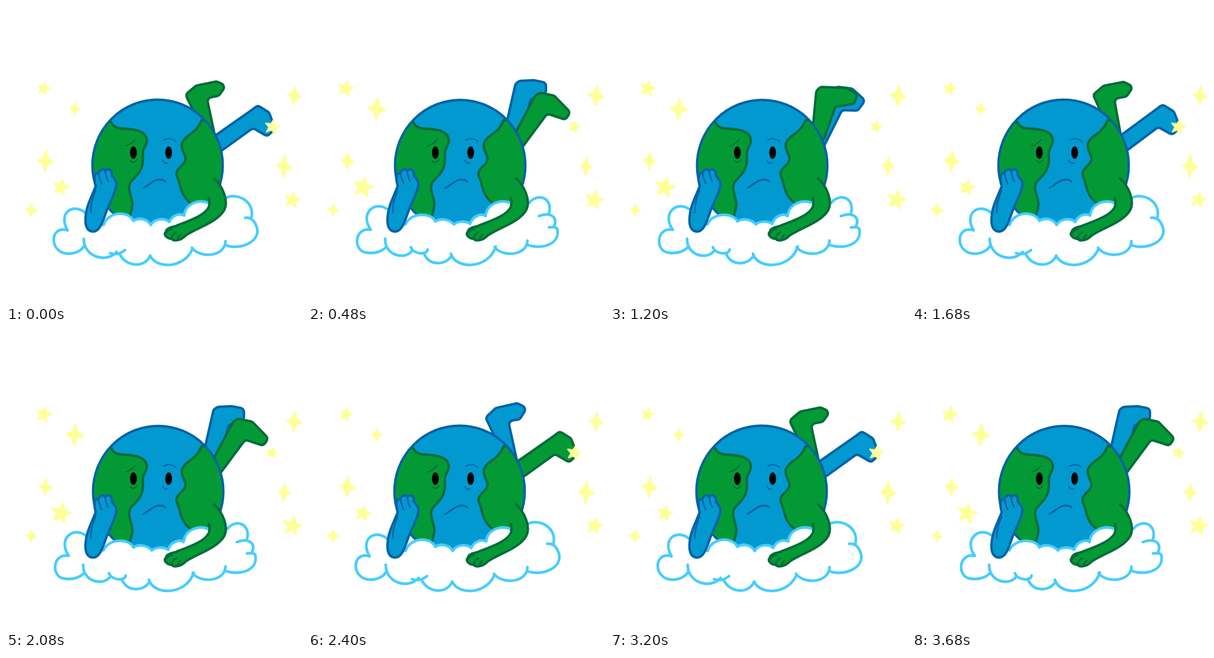
An HTML page with a canvas that plays this animation: 495 px wide and 498 px high, repeating every 3.76 s.

```html
<!DOCTYPE html>
<html lang="en">
<head>
<meta charset="utf-8">
<title>Weary planet on a cloud</title>
<style>
html, body { margin: 0; width: 100%; height: 100%; overflow: hidden; background: #fff; }
canvas { display: block; }
</style>
</head>
<body>
<canvas id="stage" width="495" height="498"></canvas>
<script>
const ctx = document.getElementById('stage').getContext('2d');
ctx.lineCap = ctx.lineJoin = 'round';

const BLUE = '#0299d0', NAVY = '#0762a6', GREEN = '#039a36', FOREST = '#066b39';
const SKY = '#46cdff', STAR = '#ffff99';
const STEP = 80, STEPS = 47, CYCLE = 20, HOLD = 5;

const shape = d => new Path2D(d);

// Leg outlines at key steps: hip, heel, toe, ankle, hip
const KEYS = [0, 6, 10, 15, 20];
const greenLeg = [
  [330,210, 300,148, 318,133, 352,126, 368,133, 356,150, 336,154, 349,215],
  [348,210, 380,150, 388,145, 412,150, 439,178, 430,190, 400,180, 354,242],
  [345,220, 412,173, 421,166, 440,178, 450,205, 437,218, 413,204, 352,248],
  [338,215, 345,142, 352,135, 396,137, 414,148, 408,164, 377,168, 358,222]
];
const blueLeg = [
  [345,220, 412,173, 421,166, 440,178, 450,205, 437,218, 413,204, 352,248],
  [330,205, 347,130, 354,125, 378,124, 398,128, 398,146, 372,156, 358,215],
  [328,208, 297,143, 314,127, 350,119, 366,127, 354,146, 335,149, 349,213],
  [345,215, 366,145, 380,135, 405,138, 427,158, 414,175, 388,174, 354,242]
];

const leftLand = shape('M176 194C182 209 200 203 215 207C232 210 240 220 233 234C225 245 232 256 227 269C222 287 204 290 206 305C207 320 216 326 208 347L205 385H120V194Z');
const rightLand = shape('M327 191C318 215 300 214 294 230C292 245 305 250 298 262C290 272 280 275 288 290C292 300 292 320 313 332L330 380H385V191Z');

const leftArm = shape('M150 301C146 286 148 277 154 280C157 272 164 271 166 276C170 270 178 273 177 283C180 289 187 292 184 303C180 318 174 328 169 340C160 366 156 377 145 377C131 376 132 358 134 345C136 330 145 315 150 301Z');
const leftArmLines = shape('M155 281C156 290 159 293 160 297M166 277C167 285 168 288 171 293M150 308C145 320 141 332 142 345');
const rightArmFill = shape('M330 290L350 289C363 301 373 325 365 341C353 362 318 371 300 384C292 392 281 394 272 387C261 381 266 372 280 369C302 361 332 351 339 336C342 326 335 318 330 305Z');
const rightArmEdge = shape('M348 288C362 301 373 325 365 341C353 362 318 371 300 384C292 392 281 394 277 389C269 389 263 382 267 378C268 371 276 370 283 368C303 360 332 351 339 336C341 330 341 326 339 321');
const fingers = shape('M277 389C277 383 281 380 285 378M268 379C272 374 275 373 278 373M287 390C287 386 290 384 292 382');

const landFace = shape('M200 234C208 231 213 228 216 223M208 259C212 263 217 261 219 257');
const seaFace = shape('M264 224C272 220 280 222 284 227M262 258C264 262 268 264 271 262');
const mouth = shape('M230 304C242 297 249 289 258 290C262 290 264 291 266 293');

// Two alternating drawings of the cloud
const clouds = [
  {
    top: 'M163 366C171 343 204 341 213 359C222 353 236 355 242 366C249 354 266 354 273 361C278 349 290 346 298 350C300 328 328 321 341 331',
    edge: 'M133 346C112 328 86 346 103 375C73 365 71 413 104 414C118 414 128 407 131 400M130 389C130 420 168 430 185 411M174 413C185 417 192 413 199 408M190 414C201 438 234 437 241 417C252 441 300 438 312 405M311 404C324 422 366 420 367 393M366 399C390 410 431 393 418 366C414 357 408 353 400 354M363 323C386 308 418 328 410 355'
  },
  {
    top: 'M163 365C171 345 206 344 213 360C222 354 236 356 244 365C250 359 264 359 271 364C276 350 290 346 297 351C299 328 328 321 341 331',
    edge: 'M132 339C111 325 86 347 105 374C77 369 75 409 97 412C112 415 126 409 131 402M129 389C128 417 163 426 175 408M172 403C177 416 200 416 200 407M194 413C201 435 231 434 240 417M239 414C247 441 302 440 314 402M312 403C325 420 366 418 367 392M366 399C391 408 422 398 417 373C415 369 410 369 403 370M370 329C384 311 410 321 403 346M386 351C405 344 419 352 411 369'
  }
].map(c => ({ fill: shape(c.top + 'L352 400H163Z'), line: shape(c.top + c.edge) }));

// x, y, points, radius in each drawing, horizontal squeeze
const stars = [
  [63,138, 5, 11,14, 1], [115,172, 4, 11,19, .8], [66,259, 4, 18,15, .75],
  [92,303, 5, 14,18, 1], [42,341, 4, 11,10, .95], [482,150, 4, 16,18, .75],
  [445,202, 5, 13,10, 1], [465,268, 4, 20,16, .65], [479,324, 5, 14,17, 1]
];

function paint(path, fill, line, width = 4) {
  if (fill) { ctx.fillStyle = fill; ctx.fill(path); }
  if (line) { ctx.strokeStyle = line; ctx.lineWidth = width; ctx.stroke(path); }
}

// Legs accelerate away from each extreme and slow into the next
function legPose(keys, step) {
  const i = KEYS.findIndex(k => k > step) - 1;
  const u = (step - KEYS[i]) / (KEYS[i + 1] - KEYS[i]) * Math.PI / 2;
  const mix = i % 2 ? Math.sin(u) : 1 - Math.cos(u);
  const next = keys[(i + 1) % 4];
  return keys[i].map((v, n) => v + (next[n] - v) * mix);
}

function drawLeg(keys, step, fill, line) {
  const p = legPose(keys, step), path = new Path2D();
  path.moveTo(p[0], p[1]);
  for (let n = 2; n < 14; n += 2) path.arcTo(p[n], p[n + 1], p[n + 2], p[n + 3], 7);
  path.lineTo(p[14], p[15]);
  paint(path, fill, line);
}

function drawEarth(b) {
  const globe = new Path2D();
  globe.ellipse(253.5 + b, 266 + b / 2, 109, 109.5, 0, 0, Math.PI * 2);
  paint(globe, BLUE);
  ctx.save();
  ctx.clip(globe);
  paint(leftLand, GREEN, FOREST);
  paint(rightLand, GREEN, FOREST);
  ctx.restore();
  paint(globe, null, NAVY);

  paint(landFace, null, FOREST, 2);
  paint(seaFace, null, NAVY, 2);
  paint(mouth, null, NAVY, 3);
  ctx.fillStyle = '#000';
  for (const x of [213, 272]) {
    ctx.beginPath();
    ctx.ellipse(x, 245, 5.7, 10.5, 0, 0, Math.PI * 2);
    ctx.fill();
  }
}

function drawStar([x, y, points, ra, rb, squeeze], b) {
  const r = b ? rb : ra, path = new Path2D();
  for (let n = 0; n < points * 2; n++) {
    const a = n * Math.PI / points - Math.PI / 2 + (points === 5 ? .22 : .1);
    const d = (r - 1) * (n % 2 ? .42 : 1);
    path.lineTo(x + Math.cos(a) * d * squeeze, y + Math.sin(a) * d);
  }
  path.closePath();
  paint(path, STAR, STAR, 2.5);
}

function draw(now) {
  const step = Math.floor(now / STEP) % STEPS % CYCLE;
  const b = Math.floor(step / HOLD) % 2;
  ctx.fillStyle = '#fff';
  ctx.fillRect(0, 0, 495, 498);
  drawLeg(blueLeg, step, BLUE, NAVY);
  drawLeg(greenLeg, step, GREEN, FOREST);
  drawEarth(b);
  paint(clouds[b].fill, '#fff');
  paint(clouds[b].line, null, SKY, 4.5);
  paint(leftArm, BLUE, NAVY);
  paint(leftArmLines, null, NAVY, 2.5);
  paint(rightArmFill, GREEN);
  paint(rightArmEdge, null, FOREST);
  paint(fingers, null, FOREST, 3);
  stars.forEach(s => drawStar(s, b));
}

const start = performance.now();
function tick() {
  draw(performance.now() - start);
  requestAnimationFrame(tick);
}
tick();
</script>
</body>
</html>
```
